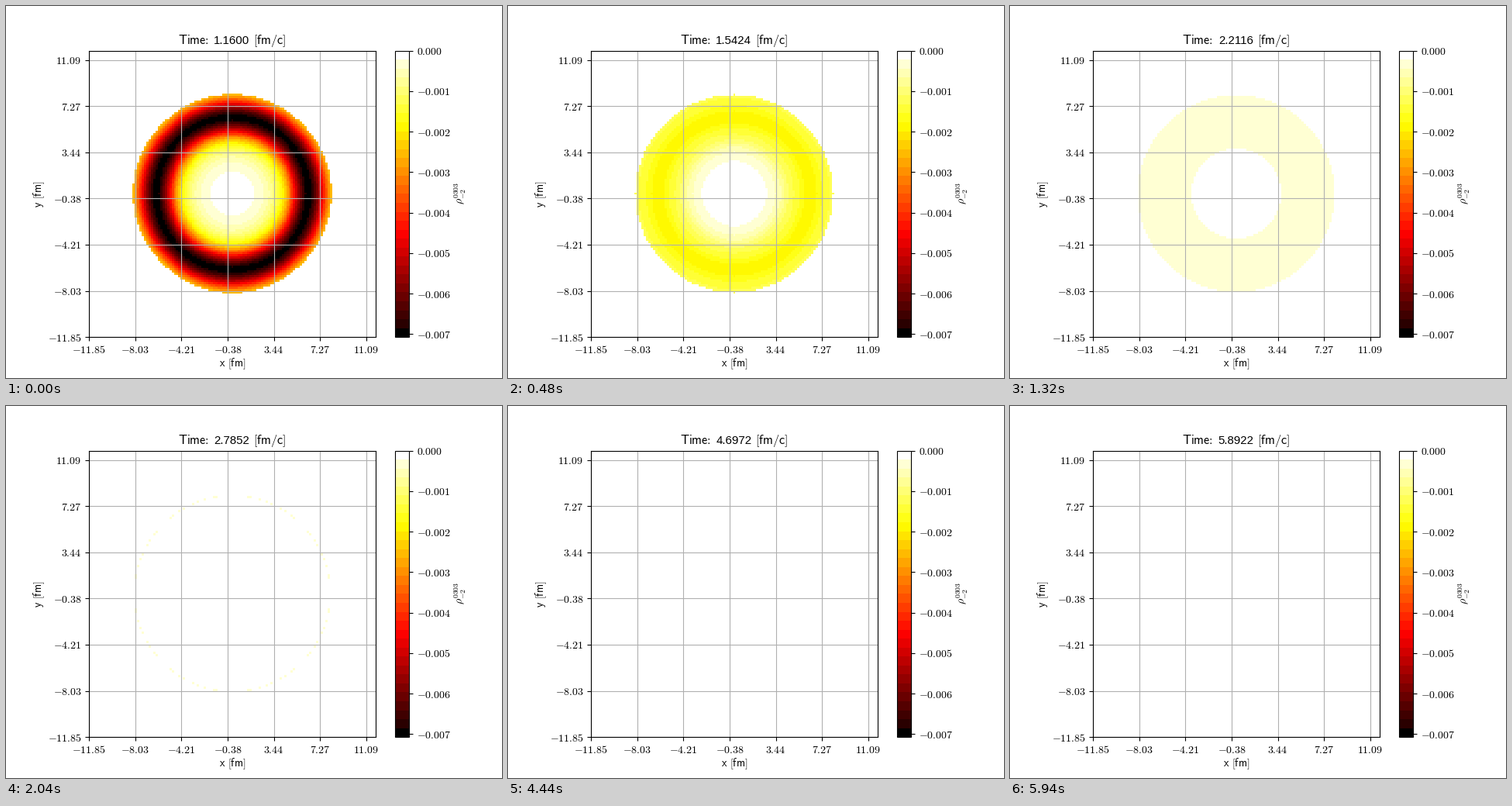
A matplotlib script for the animation above (6000 ms loop, 640 px wide and 480 px high).

```python
import numpy as np
import matplotlib.pyplot as plt
from matplotlib.animation import FuncAnimation
from matplotlib.colors import ListedColormap

plt.rcParams["mathtext.fontset"] = "cm"

W, H, DPI = 640, 480, 100
FRAMES, INTERVAL = 100, 60
T0, DT = 1.16, 0.0478
CELLS, BANDS = 125, 32
VMIN = -0.007073

idx = np.arange(CELLS) - CELLS // 2
radius = np.hypot(*np.meshgrid(idx, idx))

# A ring with long tails; its crest decays faster than its centre and rim.
ring = 0.007 * (1 + (radius - 33.3) ** 2 / 200) ** -2.6
power = 2.638 + 1.9 * np.exp(-((radius - 33) / 8) ** 4)


def now(k):
    return T0 + DT * k


def field(k):
    rim = 42.9 + 0.3 * np.exp(-k / 8)
    return np.where(radius <= rim, -ring * (now(k) / T0) ** -power, 0)


def banded_hot():
    colors = plt.get_cmap("hot")((np.arange(BANDS) + 0.5) / BANDS)
    colors[0, :3] = 0
    colors[-1, :3] = 1
    return ListedColormap(colors)


def sans(text):
    text = text.replace(":", r"\hspace{-0.2}:").replace(" ", r"\hspace{0.38}")
    return rf"$\mathsf{{{text}}}$"


def write(x, y, text, size=10, ha="center", **kw):
    return fig.text(x / W, 1 - y / H, text, fontsize=size, ha=ha,
                    va="baseline", rotation_mode="anchor", **kw)


fig = plt.figure(figsize=(W / DPI, H / DPI), dpi=DPI, facecolor="white")
ax = fig.add_axes([107.2 / W, 0.11, 369.6 / W, 0.77])
cax = fig.add_axes([501.6 / W, 0.11, 18.48 / W, 0.77])

image = ax.imshow(field(0), cmap=banded_hot(), vmin=VMIN, vmax=0,
                  origin="lower", extent=[0, CELLS, 0, CELLS],
                  interpolation="nearest")

steps = np.arange(7)
ticks = steps * 20 * CELLS / (CELLS - 1)
names = [f"${v:.2f}$" for v in -11.854 + 3.824 * steps]
ax.set_xticks(ticks, names)
ax.set_yticks(ticks, names)
ax.grid(True)

levels = np.arange(8) / 1000
bar = fig.colorbar(image, cax=cax)
bar.set_ticks(-levels, labels=[f"${'-' if v else ''}{v:.3f}$" for v in levels])

write(292, 465, sans("x [fm]"))
write(46.5, 242.4, sans("y [fm]"), rotation=90)
write(590, 241, r"$\rho^{0303}_{-2}$", rotation=90)

write(222.3, 49.3, sans("Time:"), 11.7, "left")
clock = write(291.2, 49.3, "", 10.8, family="Liberation Sans")
write(319.3, 49.3, sans("[fm/c]"), 11.7, "left")


def draw(k):
    image.set_data(field(k))
    clock.set_text(f"{now(k):.4f}")
    return image, clock


anim = FuncAnimation(fig, draw, frames=FRAMES, interval=INTERVAL,
                     repeat=True, repeat_delay=0, blit=False)
plt.show()
```
